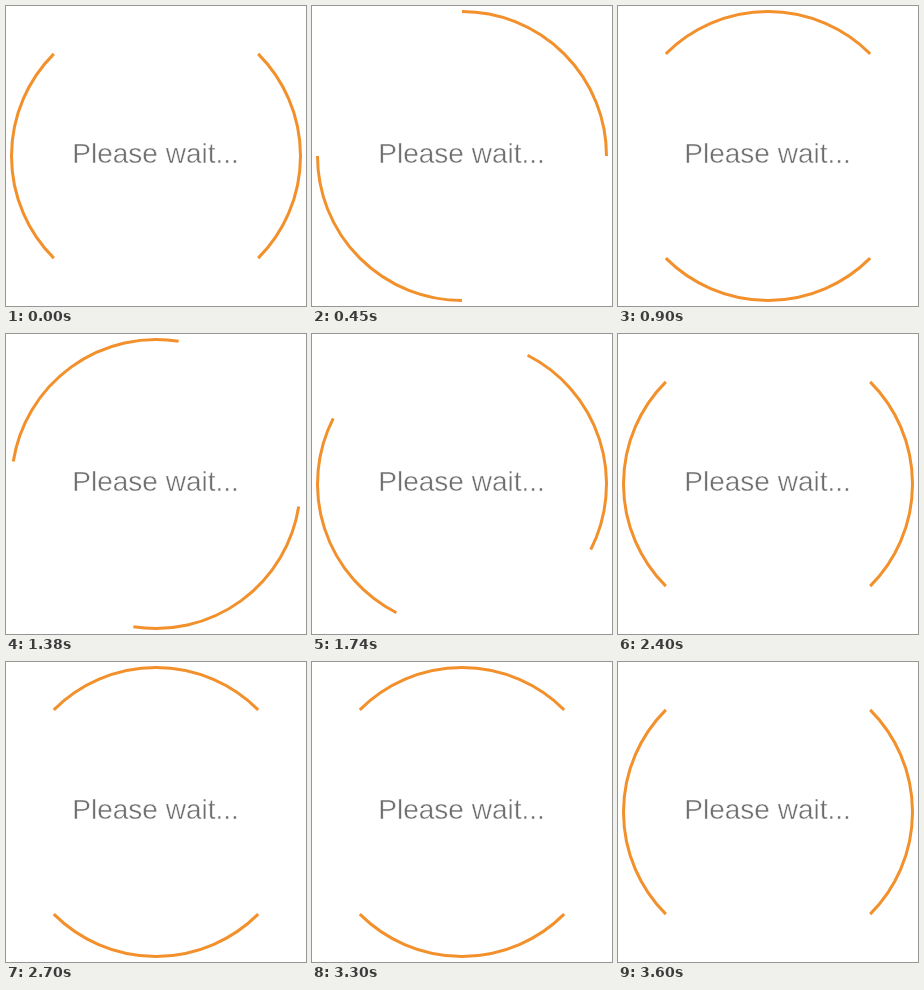
Recreate the animation shown at these times as an HTML page. Size 300 by 300 pixels, loop 3.63 s.

```html
<!DOCTYPE html>
<html lang="en">
<head>
<meta charset="utf-8">
<title>Please wait</title>
<style>
  html, body { margin: 0; width: 100%; height: 100%; overflow: hidden; background: #fff; }
  svg { display: block; width: 300px; height: 300px; }
  path { fill: none; stroke: #f2902c; stroke-width: 3; }
  /* the white outline thins the letters to a light weight */
  text { font: 28px "Liberation Sans", Arial, sans-serif; fill: #6e6e6e; stroke: #fff; stroke-width: .5; }
</style>
</head>
<body>
<svg viewBox="0 0 300 300">
  <path id="arcs"/>
  <text x="66.3" y="157">Please wait...</text>
</svg>
<script>
  const LOOP = 3630, STEP = 30, DEGREES_PER_STEP = 9;
  const RADIUS = 144.5, near = 150 - RADIUS * Math.SQRT1_2, far = 300 - near;
  const arcs = document.getElementById("arcs");

  const arc = (x, y1, y2) => `M${x} ${y1}A${RADIUS} ${RADIUS} 0 0 1 ${x} ${y2}`;
  arcs.setAttribute("d", arc(near, far, near) + arc(far, near, far));

  function draw() {
    const step = Math.floor(performance.now() % LOOP / STEP);
    arcs.setAttribute("transform", `rotate(${step * DEGREES_PER_STEP} 150 150)`);
    requestAnimationFrame(draw);
  }
  draw();
</script>
</body>
</html>
```
